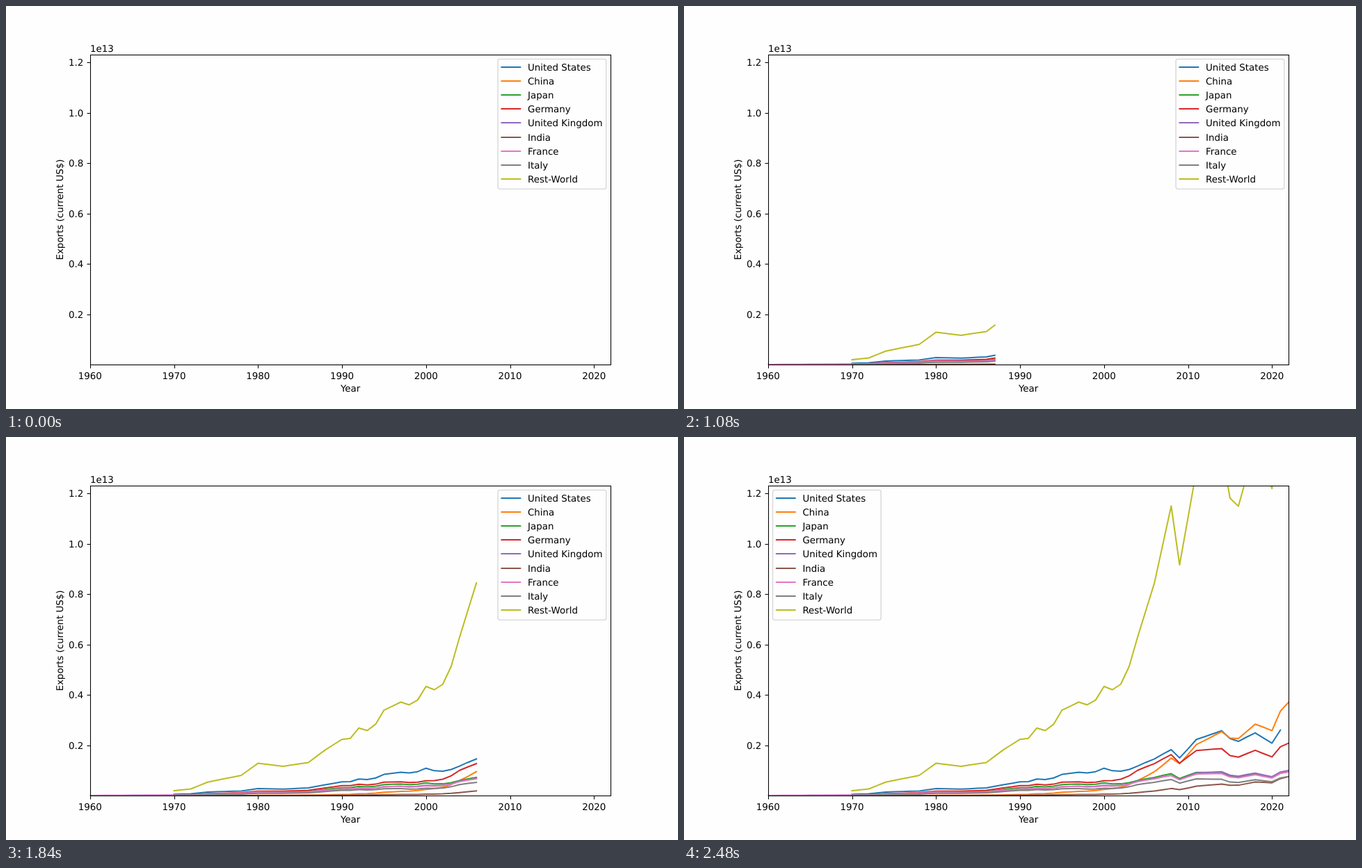
An HTML page for the animation above (2.52 s loop, 966 by 580 pixels).

```html
<!DOCTYPE html>
<html lang="en">
<head>
<meta charset="utf-8">
<title>Exports by year</title>
<style>
  html, body { margin: 0; width: 100%; height: 100%; overflow: hidden; background: #fefefe; }
  svg { display: block; width: 966px; height: 580px; }
  text { font: 13.42px "DejaVu Sans", sans-serif; fill: #000; text-rendering: geometricPrecision; }
  .axis { fill: none; stroke: #000; stroke-width: 1.07; }
  .series { fill: none; stroke-width: 2.01; stroke-linejoin: round; stroke-linecap: square; }
</style>
</head>
<body>
<svg id="chart" viewBox="0 0 966 580">
  <clipPath id="area"><rect x="120.75" y="70" width="748.65" height="446.2"/></clipPath>
</svg>
<script>
const STEP = 40, FIRST = 1960, LAST = 2022;
const LEFT = 120.75, YEAR_W = 748.65 / (LAST - FIRST);
const ZERO = 516.3, UNIT = 0.36235; // px per 10 billion US$

const chart = document.getElementById("chart");

function add(parent, tag, attrs, text) {
  const el = document.createElementNS("http://www.w3.org/2000/svg", tag);
  for (const key in attrs) el.setAttribute(key, attrs[key]);
  if (text) el.textContent = text;
  parent.appendChild(el);
  return el;
}

const px = year => LEFT + (year - FIRST) * YEAR_W;
const py = value => ZERO - value * UNIT;
const snap = v => Math.round(v) + 0.5;

// Linear interpolation between [year, value] key points
function at(keys, year) {
  const i = keys.findIndex(([y]) => y >= year);
  if (i <= 0) return keys[i < 0 ? keys.length - 1 : 0][1];
  const [a, va] = keys[i - 1], [b, vb] = keys[i];
  return va + (vb - va) * (year - a) / (b - a);
}

// Turning points of world trade; every country is a slowly changing share of it
const world = [
  [1960, 8], [1970, 20], [1972, 27], [1974, 54], [1978, 81], [1980, 129], [1983, 117], [1986, 132],
  [1988, 182], [1990, 224], [1991, 228], [1992, 269], [1993, 259], [1994, 284], [1995, 340],
  [1997, 372], [1998, 361], [1999, 380], [2000, 434], [2001, 421], [2002, 443], [2003, 514],
  [2004, 630], [2006, 845], [2008, 1151], [2009, 917], [2011, 1292], [2014, 1378], [2015, 1182],
  [2016, 1150], [2018, 1390], [2020, 1220], [2021, 1560], [2022, 1700]];

const shareYears = [1970, 1980, 1990, 2000, 2004, 2008, 2015, 2022];

// name, colour, first year, last year, percent of world trade at shareYears
const series = [
  ["United States", "#1f77b4", 1970, 2021, [30, 21.8, 24.6, 25.2, 18.7, 15.9, 19.2, 16.3]],
  ["China", "#ff7f0e", 1960, 2022, [1.2, 1.6, 2.2, 5.8, 9.6, 13, 19.4, 21.9]],
  ["Japan", "#2ca02c", 1970, 2022, [11.5, 11.3, 14.3, 11.8, 9.6, 7.6, 6.6, 5.6]],
  ["Germany", "#d62728", 1970, 2022, [16, 14.2, 17.9, 13.7, 16, 14.2, 13.5, 12.3]],
  ["United Kingdom", "#9467bd", 1960, 2022, [14.5, 11.9, 11.3, 9.6, 9.1, 7, 6.9, 5.9]],
  ["India", "#8c564b", 1960, 2022, [1.2, 0.9, 1, 1.4, 2, 2.5, 3.5, 4.5]],
  ["France", "#e377c2", 1960, 2022, [12, 11.2, 12, 9.1, 8.9, 7, 6.3, 5.6]],
  ["Italy", "#7f7f7f", 1970, 2022, [8.5, 7.6, 9.7, 6.8, 7, 5.6, 4.6, 4.5]],
  ["Rest-World", "#bcbd22", 1970, 2022, [100]]
];

// Data lines
const plot = add(chart, "g", { "clip-path": "url(#area)" });
const lines = series.map(([, color, start, end, percents]) => {
  const share = percents.map((p, i) => [shareYears[i], p / 100]);
  const points = [];
  for (let y = start; y <= end; y++) {
    points.push(px(y).toFixed(2) + "," + py(at(world, y) * at(share, y)).toFixed(2));
  }
  return { start, points, el: add(plot, "polyline", { class: "series", stroke: color }) };
});

// Axes
add(chart, "rect", { class: "axis", x: 121.5, y: 70.5, width: 748, height: 446 });
for (let year = FIRST; year <= LAST; year += 10) {
  add(chart, "path", { class: "axis", d: `M${snap(px(year))} 516.5v5` });
  add(chart, "text", { x: px(year), y: 537, "text-anchor": "middle" }, String(year));
}
for (let v = 2; v <= 12; v += 2) {
  const y = snap(py(v * 100));
  add(chart, "path", { class: "axis", d: `M121.5 ${y}h-5` });
  add(chart, "text", { x: 111.3, y: y + 4.5, "text-anchor": "end" }, (v / 10).toFixed(1));
}
add(chart, "text", { x: 121, y: 66 }, "1e13");
add(chart, "text", { x: 495.1, y: 555, "text-anchor": "middle" }, "Year");
add(chart, "text", { transform: "translate(82 293) rotate(-90)", "text-anchor": "middle" }, "Exports (current US$)");

// Legend
const legend = add(chart, "g", {});
add(legend, "rect", { x: 0, y: 76.3, width: 155.7, height: 187, rx: 2.7,
  fill: "#fefefe", "fill-opacity": 0.8, stroke: "#ccc", "stroke-opacity": 0.8, "stroke-width": 1.34 });
series.forEach(([name, color], i) => {
  const y = Math.round(87.6 + i * 20.2);
  add(legend, "path", { class: "series", stroke: color, d: `M5.4 ${y}h26.8` });
  add(legend, "text", { x: 42.9, y: y + 5 }, name);
});

// The legend jumps left once the steep line reaches its corner
function draw(year) {
  for (const { start, points, el } of lines) {
    const shown = points.slice(0, Math.max(0, year - start + 1));
    el.setAttribute("points", shown.length > 1 ? shown.join(" ") : "");
  }
  legend.setAttribute("transform", `translate(${year < 2009 ? 707.1 : 127.5} 0)`);
}

const COUNT = LAST - FIRST + 1;
const begin = performance.now();
let current = -1;
function tick() {
  const step = Math.floor(Math.max(0, performance.now() - begin) / STEP) % COUNT;
  if (step !== current) draw(FIRST + (current = step));
  requestAnimationFrame(tick);
}
tick();
</script>
</body>
</html>
```
